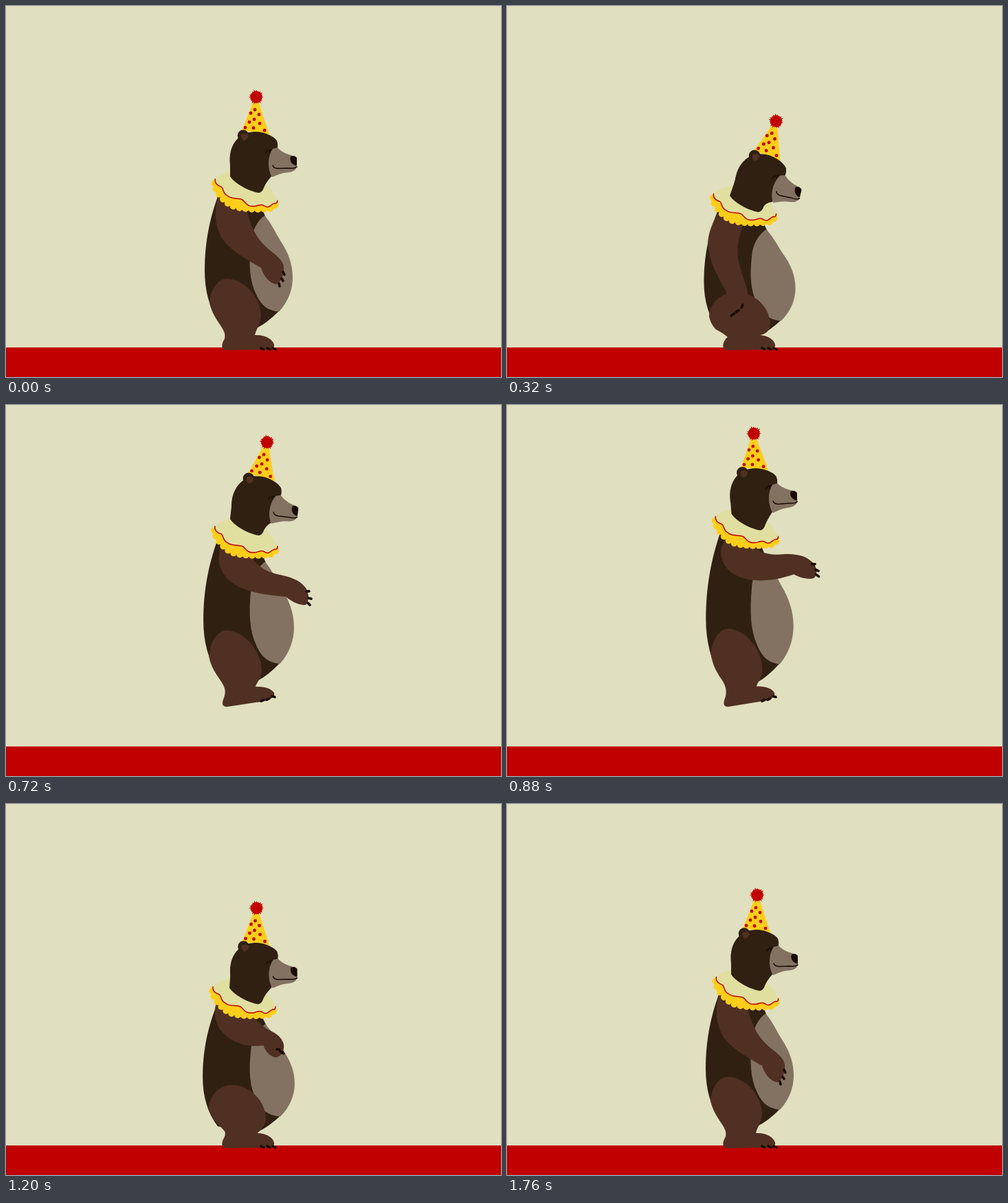
Write an HTML page with a canvas that moves like this. It is 720 px wide and 540 px high and loops after 1.96 s.

```html
<!DOCTYPE html>
<html lang="en">
<head>
<meta charset="utf-8">
<title>Jumping circus bear</title>
<style>
html, body { margin: 0; width: 100%; height: 100%; overflow: hidden; background: #e0dfc0; }
canvas { display: block; }
</style>
</head>
<body>
<canvas id="stage" width="720" height="540"></canvas>
<script>
const ctx = document.getElementById('stage').getContext('2d');
const DARK = '#302012', BROWN = '#503022', GREY = '#837262', BLACK = '#1a0c04';
const RED = '#c10000', YELLOW = '#ffce1a', CREAM = '#e0dfa0', PAPER = '#e0dfc0';
const STEP = 80, LAST = 22, LOOP = 1960;

// Blends number arrays, or the numbers inside two path strings of equal structure.
const NUMBER = /-?[\d.]+/g;
function mix(a, b, k) {
  if (Array.isArray(a)) return a.map((v, i) => v + (b[i] - v) * k);
  const goal = b.match(NUMBER);
  let i = 0;
  return a.replace(NUMBER, v => (+v + (goal[i++] - v) * k).toFixed(2));
}

function at(track, s) {
  const i = track.findIndex(key => key[0] >= s);
  if (i < 0) return track[track.length - 1][1];
  if (track[i][0] === s) return track[i][1];
  const [t0, a] = track[i - 1], [t1, b] = track[i];
  return mix(a, b, (s - t0) / (t1 - t0));
}

const LEG = {
  rest: 'M296 432C298 412 308 397 322 397C345 398 368 420 371 448C372 460 364 470 362 479C375 478 388 484 390 493C391 498 386 500 378 500L322 501C312 501 314 492 316 488C320 482 319 476 314 468C306 456 299 446 296 432Z',
  crouch: 'M294 452C295 432 310 418 332 417C360 415 384 440 383 465C381 475 374 478 368 479C378 480 388 484 390 493C391 498 386 500 378 500L322 501C312 501 314 492 316 488C318 484 320 482 321 482C312 474 307 473 303 470C298 464 296 460 294 452Z',
  tip: 'M298 417C299 397 310 380 322 380C348 381 370 410 371 440C371 455 364 460 363 466C376 466 386 470 388 476C390 482 383 485 374 487L323 496C313 497 316 488 318 482C320 474 318 464 313 456C306 446 300 434 298 417Z',
  air: 'M295 422C297 402 308 385 321 385C348 386 372 417 372 443C372 455 364 461 363 467C376 466 387 470 390 476C392 482 385 485 376 488L323 496C312 497 315 489 317 483C320 475 319 469 314 461C305 447 298 439 295 422Z'
};
const TOES = {
  flat: 'M371 498L375 500M380 498L384 500M388 498L392 500',
  tip: 'M371 488L375 486M379 486L383 484M387 481L391 482'
};
const ARM = {
  rest: 'M308 278C302 300 304 320 314 338C326 356 352 370 371 381C374 392 383 403 392 405C400 404 405 390 404 379C403 370 392 362 382 354C364 338 358 325 349 295Z',
  back: 'M306 302C296 322 290 338 293 355C297 378 310 400 319 416C316 430 318 445 326 448C336 450 350 440 350 428C351 416 348 408 345 399C338 375 328 360 344 318Z',
  up: 'M311 240C306 262 306 285 314 303C326 325 350 340 363 351C366 362 375 376 384 377C391 374 395 362 394 349C393 340 382 328 374 318C362 304 357 290 353 262Z',
  reach: 'M313 262C307 277 309 292 318 305C334 327 370 333 407 336C414 342 426 349 436 348C441 344 442 329 434 321C426 311 412 307 398 304C380 300 368 295 352 272Z',
  out: 'M330 235C312 245 308 262 315 274C330 303 376 304 428 271C436 274 448 274 457 270C464 264 461 252 450 247C440 240 425 241 412 244C395 250 380 258 364 252Z'
};
const CLAWS = {
  rest: 'M403 387L405 391M401 397L403 400M397 404L398 408',
  back: 'M326 451L330 448M333 446L337 443M341 439L343 435',
  up: 'M392 361L395 365M389 370L391 373M384 376L385 380',
  reach: 'M437 328L441 328M440 338L444 339M439 345L442 348',
  out: 'M450 249L455 249M458 255L462 258M460 262L465 265'
};

const armTrack = p => [
  [0, p.rest], [4, p.back], [5, mix(p.rest, p.back, 1.05)], [7, p.up], [9, p.reach], [13, p.out],
  [14, mix(p.out, p.rest, .24)], [16, mix(p.rest, p.back, .7)], [18, p.rest]
];
const tracks = {
  leg: [
    [0, LEG.rest], [4, LEG.crouch], [5, mix(LEG.rest, LEG.crouch, 1.2)], [6, LEG.rest], [7, LEG.tip],
    [9, LEG.air], [13, LEG.tip], [14, LEG.rest], [16, mix(LEG.rest, LEG.crouch, 1.2)], [18, LEG.rest]
  ],
  toes: [[0, TOES.flat], [6, TOES.flat], [7, TOES.tip], [13, TOES.tip], [14, TOES.flat]],
  arm: armTrack(ARM),
  claws: armTrack(CLAWS),
  // scale x, scale y, shift y
  torso: [
    [0, [1, 1, 0]], [4, [1.04, .95, 12]], [5, [1.07, .93, 16]], [6, [1, 1.03, 3]], [7, [.96, 1.153, -7]],
    [9, [1.03, 1.06, -10]], [13, [.96, 1.153, -7]], [14, [1, 1, 0]], [16, [1.09, .92, 18]], [18, [1, 1, 0]]
  ],
  // shift x, shift y
  neck: [
    [0, [0, 0]], [4, [-2, 28]], [5, [-2, 36]], [6, [-1, 6]], [7, [.5, -41]], [9, [0, -25]],
    [13, [1, -40]], [14, [0, -3]], [16, [-2, 42]], [18, [0, 0]]
  ],
  // shift x, shift y, degrees
  head: [
    [0, [0, 0, 0]], [2, [1, 13, 6]], [4, [3, 29.5, 13.3]], [5, [3, 36, 15]], [6, [3, 6, 17]],
    [7, [1.5, -35.5, 16.4]], [9, [.4, -24.3, 8.3]], [13, [-1.4, -43, -13]], [14, [-1, -3, -9]],
    [16, [2, 41, 9]], [18, [0, 0, 0]]
  ],
  collar: [
    [0, [1, -5, 1.5]], [4, [-2.5, 15.5, 0]], [5, [-2, 24, 0]], [6, [-1, 8, 0]], [7, [1, -41.5, 0]],
    [9, [1, -24.5, 0]], [13, [0, -53, 0]], [14, [-1, -15, 0]], [16, [-3, 31, 0]], [18, [0, 0, 0]],
    [22, [1, -5, 1.5]]
  ]
};

function fill(path, color) {
  ctx.fillStyle = color;
  ctx.fill(new Path2D(path));
}
function stroke(path, color, width) {
  ctx.strokeStyle = color;
  ctx.lineWidth = width;
  ctx.stroke(new Path2D(path));
}
function dot(x, y, r, color) {
  ctx.fillStyle = color;
  ctx.beginPath();
  ctx.arc(x, y, r, 0, 7);
  ctx.fill();
}
function pivot(px, py, [x, y, degrees], draw) {
  ctx.save();
  ctx.translate(px + x, py + y);
  ctx.rotate(degrees * Math.PI / 180);
  ctx.translate(-px, -py);
  draw();
  ctx.restore();
}

function drawTorso([sx, sy, dy]) {
  ctx.save();
  ctx.translate(353, 468 + dy);
  ctx.scale(sx, sy);
  ctx.translate(-353, -468);
  fill('M314 262C296 305 289 345 289 385C289 415 296 440 310 460L366 468Q380 461 397 444L412 400L378 308L368 285Z', DARK);
  fill('M376 305C366 312 357 328 356 345C353 375 354 400 364 420C370 433 378 443 397 445C411 430 417 412 417 395C417 375 410 358 400 343C392 330 386 316 376 305Z', GREY);
  ctx.restore();
}

function drawCollar() {
  const scallops = [[302, 264], [304, 272], [309, 280], [315, 287], [322, 293], [330, 297], [339, 299],
    [348, 300], [357, 300.5], [366, 300.5], [375, 300], [384, 299], [391, 294]];
  const edge = 'C302 264 307 268 312 269C316 272 314 278 320 281C328 288 336 284 343 287C349 292 351 297 359 296C366 297 368 291 375 295C382 300 384 293 390 291Q394 292 394 287';
  for (const [x, y] of scallops) dot(x, y, 4.7, YELLOW);
  fill('M302 258L298 265L304 276L318 291L340 302L370 303L390 299L396 290L394 286Z', YELLOW);
  fill('M303 258' + edge + 'C388 273 378 264 370 259L327 246Q312 249 303 258Z', CREAM);
  stroke('M303 258' + edge, RED, 1.5);
}

function drawNeck([nx, ny], [hx, hy, degrees]) {
  const a = degrees * Math.PI / 180, c = Math.cos(a), s = Math.sin(a);
  const onHead = (x, y) => `${352 + hx + (x - 352) * c - (y - 240) * s} ${240 + hy + (x - 352) * s + (y - 240) * c}`;
  const base = (x, y) => `${x + nx} ${y + ny}`;
  fill(`M${onHead(326, 218)}Q${onHead(326, 233)} ${base(326, 248)}C${base(334, 260)} ${base(355, 270)} ${base(368, 272)}` +
    `Q${base(372, 271)} ${base(374, 267)}Q${base(377, 258)} ${onHead(386, 248)}L${onHead(382, 210)}Z`, DARK);
}

function drawHead() {
  fill('M360 138L367 138L383.5 189Q362 181 342.5 183Z', YELLOW);
  const spots = [[362, 151], [356, 156], [368, 158], [361, 165], [354, 169], [369, 171], [348, 177], [360, 177.5], [376, 181]];
  for (const [x, y] of spots) dot(x, y, 2.4, RED);

  ctx.fillStyle = RED;
  ctx.beginPath();
  for (let i = 0; i < 40; i++) {
    const a = i * Math.PI / 20, r = i % 2 ? 8 : 10.3 + Math.sin(i * 2.3);
    ctx.lineTo(364 + r * Math.cos(a), 132.5 + r * Math.sin(a));
  }
  ctx.fill();

  fill('M326 232C324 215 328 202 337 193C343 185 354 183 365 183C378 184 390 190 394 196Q396 201 395 207L388 228L385 248Q350 260 326 232Z', DARK);
  dot(345, 188.5, 8.3, DARK);
  fill('M342 187Q349 183 353 189Q351 195 346 196Q341 192 342 187Z', BROWN);
  fill('M395 206Q399 211 408 215L423 220L423 235Q420 241 412 242C400 243 395 246 387 249C380 238 380 219 388 208Z', GREY);
  fill('M414 219Q420 216 423 222L423 232Q420 233 416 229Q412 224 414 219Z', BLACK);
  stroke('M388 232Q389 236 395 236.5L412 236Q420 237 423 234', BLACK, 1.5);
  stroke('M378 214Q379 210 386 209M383 210L384 213', BLACK, 1.6);
}

function draw(s) {
  const pose = {};
  for (const part in tracks) pose[part] = at(tracks[part], s);
  const jump = Math.max(0, 64 * (1 - ((s - 10) / 3) ** 2));

  ctx.fillStyle = PAPER;
  ctx.fillRect(0, 0, 720, 540);
  ctx.fillStyle = RED;
  ctx.fillRect(0, 497, 720, 43);

  ctx.save();
  ctx.translate(0, -jump);
  ctx.lineCap = ctx.lineJoin = 'round';
  drawTorso(pose.torso);
  fill(pose.leg, BROWN);
  stroke(pose.toes, BLACK, 3.6);
  fill(pose.arm, BROWN);
  stroke(pose.claws, BLACK, 3.6);
  pivot(346, 275, pose.collar, drawCollar);
  drawNeck(pose.neck, pose.head);
  pivot(352, 240, pose.head, drawHead);
  ctx.restore();
}

function tick() {
  draw(Math.min(LAST, Math.floor(performance.now() % LOOP / STEP)));
  requestAnimationFrame(tick);
}
tick();
</script>
</body>
</html>
```
